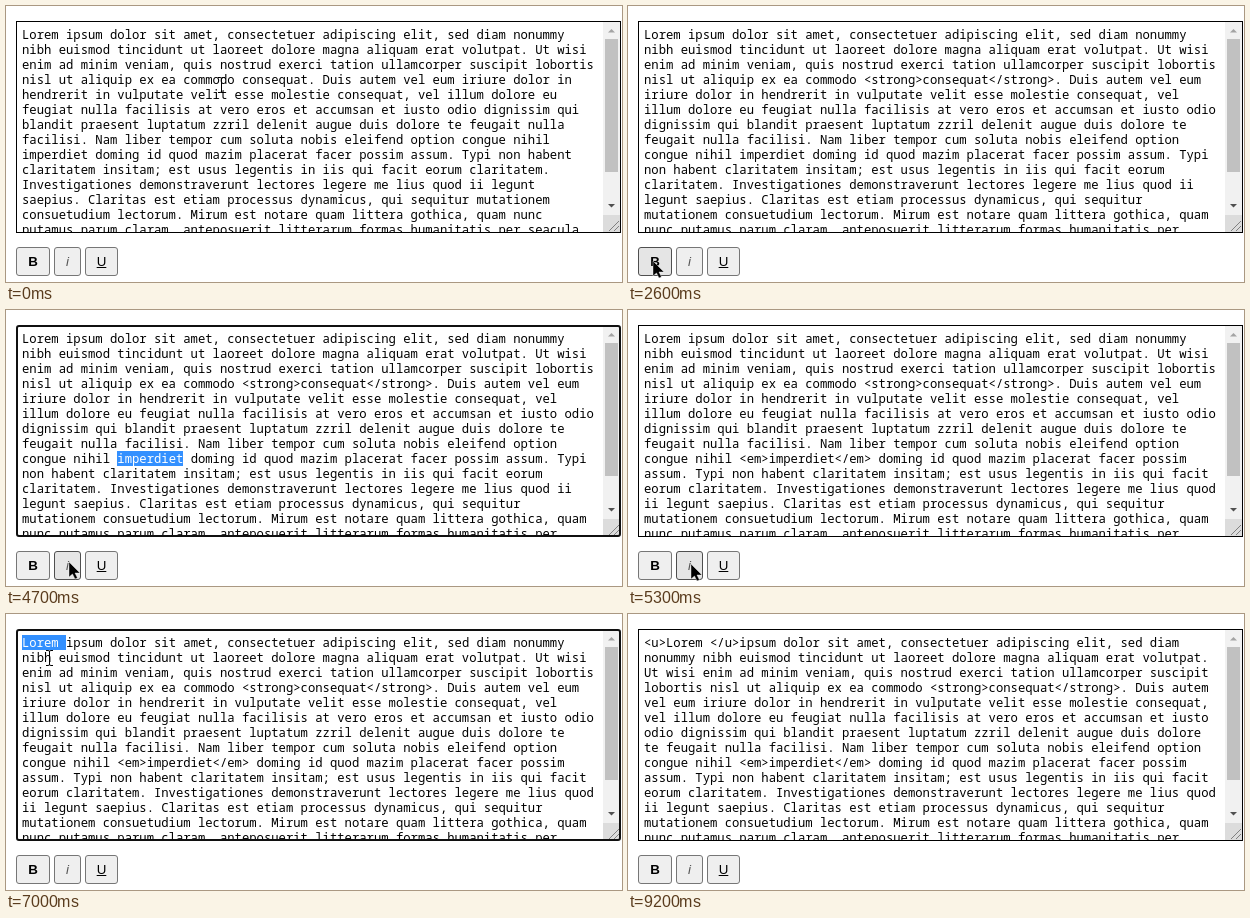
An HTML page for the animation above (10000 ms loop, 616 by 276 pixels).

```html
<!DOCTYPE html>
<html lang="la">
<head>
<meta charset="utf-8">
<title>Text formatting buttons</title>
<style>
  html, body { margin: 0; width: 100%; height: 100%; overflow: hidden; background: #fff; }
  #stage { position: relative; width: 616px; height: 276px; overflow: hidden; }
  #field, #ring { position: absolute; left: 10px; top: 15px; width: 605px; height: 212px; box-sizing: border-box; }
  #field { border: 1px solid #000; }
  #ring { border: 2px solid #101010; border-radius: 3px; visibility: hidden; }
  .focused #ring { visibility: visible; }
  .focused #field { border-color: transparent; }
  #view { position: absolute; inset: 0; overflow: hidden; }
  #text {
    position: absolute; left: 5px; top: 5px; margin: 0; white-space: pre; color: #000;
    font: 300 12.222px/15px "Noto Sans Mono", "DejaVu Sans Mono", monospace; font-variant-ligatures: none;
  }
  mark { display: inline-block; height: 15px; background: #3390ff; color: #fff; }
  #bar { position: absolute; right: 0; top: 0; }
  .button {
    position: absolute; top: 241px; height: 29px; box-sizing: border-box; padding-top: 6px;
    border: 1px solid #767676; border-radius: 3px; background: #efefef; color: #000; text-align: center;
    font: 13.333px/15px "Liberation Sans", Arial, sans-serif;
  }
  .button.hover { background: #e5e5e5; border-color: #4f4f4f; }
  .button.press { background: #f5f5f5; border-color: #8d8d8d; }
  #bold { left: 10px; width: 34px; font-weight: bold; }
  #italic { left: 48px; width: 27px; font-style: italic; color: #555; }
  #under { left: 79px; width: 33px; text-decoration: underline; }
  #pointer { position: absolute; left: 0; top: 0; overflow: visible; }
</style>
</head>
<body>
<div id="stage">
  <div id="field">
    <div id="view">
      <pre id="text"></pre>
      <svg id="bar" width="17" height="210">
        <rect width="17" height="210" fill="#f1f1f1"/>
        <rect x="2" y="17" width="13" height="133" fill="#c1c1c1"/>
        <path d="M5 10.5 8.5 7 12 10.5z" fill="#a3a3a3"/>
        <path d="M5 182 8.5 185.5 12 182z" fill="#505050"/>
        <rect y="193" width="17" height="17" fill="#dcdcdc"/>
        <path d="M6 209 16 199M11 209 16 204" stroke="#808080" fill="none"/>
      </svg>
    </div>
  </div>
  <div id="ring"></div>
  <div class="button" id="bold">B</div>
  <div class="button" id="italic">i</div>
  <div class="button" id="under">U</div>
  <svg id="pointer" width="1" height="1">
    <path id="arrow" d="M0 0V15L3.5 12 6 17 8.5 16 6 11H11z" fill="#000" stroke="#fff" stroke-width=".4"/>
    <path id="beam" d="M-3 -7.5H-1L.5 -7 2 -7.5H4M.5 -7V7M-3 7.5H-1L.5 7 2 7.5H4" fill="none" stroke="#000"/>
  </svg>
</div>
<script>
const LOOP = 10000, STEP = 100, COLUMNS = 78, CURSOR_GONE = 9100;

const passage = `Lorem ipsum dolor sit amet, consectetuer adipiscing elit, sed diam nonummy nibh euismod tincidunt ut laoreet dolore magna aliquam erat volutpat. Ut wisi enim ad minim veniam, quis nostrud exerci tation ullamcorper suscipit lobortis nisl ut aliquip ex ea commodo consequat. Duis autem vel eum iriure dolor in hendrerit in vulputate velit esse molestie consequat, vel illum dolore eu feugiat nulla facilisis at vero eros et accumsan et iusto odio dignissim qui blandit praesent luptatum zzril delenit augue duis dolore te feugait nulla facilisi. Nam liber tempor cum soluta nobis eleifend option congue nihil imperdiet doming id quod mazim placerat facer possim assum. Typi non habent claritatem insitam; est usus legentis in iis qui facit eorum claritatem. Investigationes demonstraverunt lectores legere me lius quod ii legunt saepius. Claritas est etiam processus dynamicus, qui sequitur mutationem consuetudium lectorum. Mirum est notare quam littera gothica, quam nunc putamus parum claram, anteposuerit litterarum formas humanitatis per seacula`;

// Each edit: click into the field, select a word, press a button, tags appear.
const edits = [
  { word: "consequat", tag: "strong", button: "bold", focus: 900, select: 1100, press: 2400, apply: 2600 },
  { word: "imperdiet", tag: "em", button: "italic", focus: 3800, select: 4000, press: 4900, apply: 5000 },
  { word: "Lorem ", tag: "u", button: "under", focus: 6400, select: 6600, press: 7700, apply: 7900 },
];

// Pointer stops: time, x, y
const path = [
  [0, 215, 79], [800, 257, 68], [1700, 257, 68], [2300, 25, 255], [3100, 25, 255],
  [3700, 146, 149], [4200, 146, 149], [4700, 63, 252], [5300, 63, 254],
  [6100, 42, 38], [6300, 40, 32], [6900, 40, 32], [7600, 98, 249], [LOOP, 98, 249],
];

const $ = id => document.getElementById(id);
const stage = $("stage"), text = $("text");
const within = (t, from, to) => t >= from && t < to;
const ease = p => p * p * (3 - 2 * p);
const show = (id, on) => $(id).style.display = on ? "" : "none";

function wrap(source) {
  const lines = [""];
  for (const word of source.split(" ")) {
    const line = lines[lines.length - 1];
    if (!line) lines[lines.length - 1] = word;
    else if (line.length + 1 + word.length <= COLUMNS) lines[lines.length - 1] += " " + word;
    else lines.push(word);
  }
  return lines.join("\n");
}

function textAt(t) {
  let source = passage;
  for (const { word, tag, apply } of edits)
    if (t >= apply) source = source.replace(word, `<${tag}>${word}</${tag}>`);
  let html = wrap(source).replace(/</g, "&lt;").replace(/>/g, "&gt;");
  const chosen = edits.find(e => within(t, e.select, e.press));
  if (chosen) html = html.replace(chosen.word, "<mark>$&</mark>");
  return html;
}

function pointerAt(t) {
  const next = path.findIndex(stop => stop[0] > t);
  const [t0, x0, y0] = path[next - 1], [t1, x1, y1] = path[next];
  const p = ease((t - t0) / (t1 - t0));
  return [Math.round(x0 + (x1 - x0) * p), Math.round(y0 + (y1 - y0) * p)];
}

function render(t) {
  text.innerHTML = textAt(t);
  stage.className = edits.some(e => within(t, e.focus, e.press)) ? "focused" : "";

  const [x, y] = pointerAt(t), visible = t < CURSOR_GONE;
  const inField = x > 10 && y < 227;
  show("beam", visible && inField);
  show("arrow", visible && !inField);
  $("pointer").style.transform = `translate(${x}px, ${y}px)`;

  for (const { button, press, apply } of edits) {
    const el = $(button), left = el.offsetLeft;
    const over = visible && y >= 241 && within(x, left, left + el.offsetWidth);
    el.classList.toggle("hover", over);
    el.classList.toggle("press", within(t, press, apply));
  }
}

const start = performance.now();
let shown = -1;
function tick() {
  const elapsed = Math.max(0, performance.now() - start) % LOOP;
  const t = Math.floor(elapsed / STEP) * STEP;
  if (t !== shown) render(shown = t);
  requestAnimationFrame(tick);
}
tick();
</script>
</body>
</html>
```
